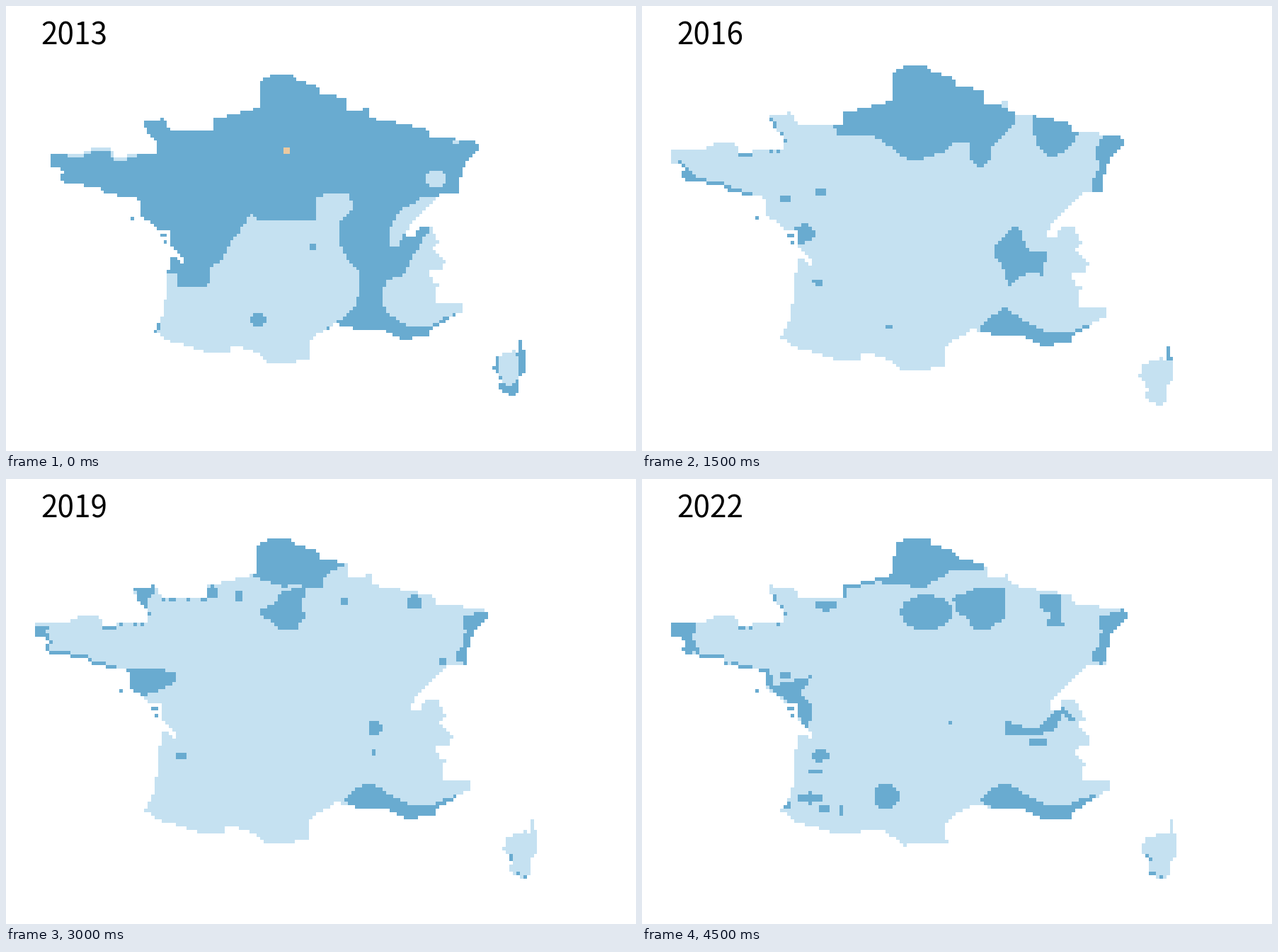
Animation of 890x629 px, one loop 5 s. Source, as a matplotlib script:

```python
import numpy as np
import matplotlib.pyplot as plt
from matplotlib.animation import FuncAnimation
from matplotlib.path import Path

W, H, DPI = 890, 629, 100
COLS, ROWS = 146, 99
SMALL = (63.4, 96.7, 4.688)    # left, top, cell size
LARGE = (41.5, 84.1, 4.958)
SEA, LIGHT, DARK, ORANGE = range(4)
PALETTE = np.array([(255, 255, 255), (197, 225, 241),
                    (105, 171, 208), (235, 201, 160)], np.uint8)

# All shapes use the pixels of the large view.
X, Y = np.meshgrid(LARGE[0] + (np.arange(COLS) + 0.5) * LARGE[2],
                   LARGE[1] + (np.arange(ROWS) + 0.5) * LARGE[2])


def polygon(points):
    cells = np.column_stack([X.ravel(), Y.ravel()])
    return Path(points).contains_points(cells).reshape(X.shape)


def ellipse(x, y, rx, ry):
    return ((X - x) / rx) ** 2 + ((Y - y) / ry) ** 2 < 1.15


def rect(x1, y1, x2, y2):
    return (X > x1) & (X < x2) & (Y > y1) & (Y < y2)


def pairs(*numbers):
    return np.reshape(numbers, (-1, 2)).astype(float)


# ---- land: key points of the coast, clockwise from the western tip ----
NORTH = pairs(41, 204, 87, 202, 101, 195, 130, 194, 137, 208, 151, 208,
              156, 204, 201, 204, 201, 189, 187, 172, 181, 159, 181, 150,
              187, 154, 211, 150, 221, 168, 285, 170, 285, 150, 303, 147,
              352, 134, 356, 92, 374, 84, 403, 84, 408, 95, 436, 98,
              444, 112, 482, 119, 484, 139, 508, 138, 514, 128, 518, 149,
              600, 164, 609, 177, 678, 184)
EAST = pairs(682, 196, 661, 216, 652, 246, 651, 263, 622, 263, 576, 310,
             572, 328, 586, 328, 590, 313, 610, 313, 621, 338, 611, 345,
             631, 364, 624, 376, 606, 379, 611, 393, 625, 400, 616, 405,
             619, 425, 656, 427, 656, 438, 606, 468, 604, 477, 566, 479)
SOUTH = pairs(534, 464, 505, 466, 468, 457, 438, 473, 428, 483, 428, 506,
              433, 511, 368, 516, 342, 495, 312, 491, 308, 501, 276, 500,
              240, 489, 208, 479, 206, 471, 191, 471, 203, 458, 211, 440,
              216, 383, 221, 358, 231, 358, 240, 370, 240, 361, 221, 340,
              221, 318, 206, 318, 177, 296, 172, 270, 120, 262, 112, 252,
              62, 248, 57, 238, 62, 230, 57, 223, 42, 223)
CORSICA = pairs(740, 481, 745, 481, 750, 503, 750, 530, 741, 540, 740, 555,
                733, 566, 711, 554, 715, 542, 702, 523, 707, 506, 734, 497,
                740, 500)
ISLANDS = rect(206, 323, 216, 328) | rect(211, 333, 216, 338) \
    | rect(161, 298, 166, 303)


def make_land(stretch):
    corner = np.array(LARGE[:2])
    coast = np.vstack([NORTH, EAST, SOUTH])
    shapes = [corner + (s - corner) * stretch for s in (coast, CORSICA)]
    return polygon(shapes[0]) | polygon(shapes[1]) | ISLANDS


def steps_to_sea(land, limit=4):
    depth, rest = np.zeros(land.shape, int), land
    for _ in range(limit):
        depth += rest
        p = np.pad(rest, 1)
        rest = rest & p[:-2, 1:-1] & p[2:, 1:-1] & p[1:-1, :-2] & p[1:-1, 2:]
    return depth


EARLY, LATE = make_land(1), make_land((1.006, 1.005))


class Year:
    def __init__(self, land=EARLY, kind=LIGHT, view=LARGE):
        self.land, self.view = land, view
        self.kind = np.full(X.shape, kind)
        self.kind[ISLANDS] = DARK

    def area(self, *xy, kind=DARK):
        self.kind[polygon(pairs(*xy))] = kind
        return self

    def ovals(self, *items, kind=DARK):
        for item in items:
            self.kind[ellipse(*item)] = kind
        return self

    def shore(self, box, depth=1, share=1, kind=DARK):
        """Colour the cells near the sea in a box, or a random share."""
        steps = steps_to_sea(self.land)
        chosen = np.random.default_rng(5).random(X.shape) < share
        self.kind[rect(*box) & (steps > 0) & (steps <= depth) & chosen] = kind
        return self


# ---- places that return in several years ----
BRITTANY_TIP = (40, 202, 78, 204, 72, 225, 80, 243, 60, 250, 40, 240)
BRITTANY_SOUTH = (50, 210, 158, 270)
COTENTIN = (178, 146, 216, 146, 210, 160, 200, 172, 201, 189, 196, 189,
            186, 170)
ALSACE = (648, 194, 684, 183, 684, 196, 660, 238, 652, 264, 632, 254,
          645, 235, 649, 215)
JURA = (625, 268, 596, 268, 558, 292, 547, 318, 549, 340, 558, 343,
        570, 322, 625, 277)
RIVIERA = (478, 455, 488, 441, 512, 429, 525, 435, 547, 448, 571, 462,
           600, 463, 621, 452, 650, 442, 606, 480, 586, 490, 500, 470)


def alps(year, west):
    year.area(612, 308, 601, 325, 586, 350, 568, 383, west + 10, 390,
              west, 403, west, 424, 547, 444, 576, 461, 606, 463, 631, 446,
              662, 437, 662, 420, 640, 350, kind=LIGHT)
    return year.area(*JURA, kind=LIGHT)


y13 = alps(Year(kind=DARK, view=SMALL), 537)
y13.area(190, 520, 211, 430, 215, 383, 228, 383, 229, 401, 265, 402, 279, 396,
         279, 373, 299, 361, 309, 335, 328, 312, 339, 292, 349, 302, 437, 300,
         438, 268, 453, 263, 487, 263, 493, 282, 473, 307, 473, 337, 487, 366,
         502, 376, 502, 407, 498, 431, 478, 447, 440, 474, 429, 521,
         kind=LIGHT)
y13.ovals((616, 240, 15, 12), (726, 522, 14, 26), (646, 186, 5, 3), kind=LIGHT)
y13.shore((65, 190, 170, 212), kind=LIGHT)
y13.ovals((350, 451, 12, 9), (435, 342, 5, 5))
y13.ovals((394, 198, 5, 5), kind=ORANGE)

y14 = Year(view=SMALL)
y14.area(319, 130, 319, 174, 346, 174, 385, 213, 400, 213, 425, 203, 440, 188,
         455, 168, 479, 154, 479, 80, 340, 80)
y14.area(235, 165, 315, 140, 315, 151, 275, 189, 255, 189)
y14.area(*COTENTIN).area(*BRITTANY_TIP).area(*ALSACE)
y14.shore((75, 190, 121, 210), 2).shore(BRITTANY_SOUTH)
y14.area(170, 273, 210, 273, 215, 262, 222, 273, 240, 279, 218, 286, 222, 311,
         240, 312, 240, 325, 228, 340, 205, 320, 172, 292, 196, 290, 195, 280)
y14.area(562, 150, 631, 177, 631, 194, 602, 213, 567, 213, 562, 203)
y14.area(498, 437, 513, 430, 532, 448, 557, 461, 557, 476, 498, 464)
y14.ovals((249, 262, 5, 5), (477, 173, 5, 5), (487, 185, 5, 3),
          (515, 351, 12, 13), (517, 375, 4, 20), (554, 372, 8, 5))
y14.shore((616, 438, 648, 462), 2).shore((711, 550, 740, 567), 2)
y14.shore((738, 480, 746, 496))

y15 = alps(Year(kind=DARK), 522)
y15.area(349, 253, 375, 242, 400, 258, 433, 245, 487, 241, 507, 230, 532, 228,
         532, 264, 513, 305, 497, 325, 480, 328, 482, 363, 507, 373, 507, 392,
         498, 429, 480, 445, 455, 462, 418, 478, 418, 520, 195, 520, 216, 403,
         216, 383, 230, 385, 236, 402, 280, 405, 290, 393, 280, 380, 300, 350,
         290, 340, 290, 323, 312, 312, 315, 288, 344, 263, kind=LIGHT)
y15.area(315, 204, 339, 208, 355, 220, 349, 243, 322, 218, kind=LIGHT)
y15.ovals((616, 228, 20, 20), (729, 520, 12, 14), (250, 204, 20, 10),
          (408, 218, 5, 5), (114, 228, 17, 10), (163, 241, 27, 12),
          (512, 135, 6, 6), kind=LIGHT)
y15.area(204, 442, 230, 437, 270, 442, 281, 470, 250, 476, 195, 471)
y15.area(285, 403, 310, 408, 324, 427, 355, 432, 385, 443, 380, 462, 350, 468,
         315, 443, 298, 435)
y15.area(384, 278, 410, 263, 414, 263, 414, 283, 394, 286)
y15.ovals((436, 342, 3, 5), (351, 377, 7, 4))

y17 = Year().area(*ALSACE).area(*RIVIERA).shore(BRITTANY_SOUTH)
y17.area(268, 170, 285, 155, 308, 152, 354, 130, 350, 80, 482, 80, 484, 139,
         507, 146, 523, 150, 523, 164, 497, 189, 482, 199, 471, 199, 458, 184,
         443, 184, 428, 203, 403, 213, 379, 213, 344, 189, 319, 174, 280, 180)
y17.area(557, 155, 590, 160, 611, 174, 601, 204, 572, 209, 561, 193)
y17.area(522, 317, 533, 317, 543, 346, 571, 348, 564, 362, 567, 382, 548, 372,
         517, 397, 512, 370, 502, 355, 502, 338)
y17.ovals((478, 214, 10, 9), (252, 262, 7, 5), (204, 273, 7, 6),
          (231, 321, 9, 9), (248, 391, 7, 4), (349, 455, 5, 3))
y17.shore((181, 150, 206, 210), share=0.5).shore((738, 480, 746, 501))

y19 = Year().area(*ALSACE).area(*RIVIERA).area(*COTENTIN)
y19.shore(BRITTANY_SOUTH).shore((40, 210, 60, 224), 2)
y19.area(349, 139, 350, 80, 440, 80, 480, 122, 452, 134, 447, 152, 425, 154,
         408, 145, 395, 154, 364, 142)
y19.area(406, 154, 424, 154, 418, 180, 424, 193, 410, 213, 389, 213, 359, 192,
         359, 185, 384, 174, 386, 163)
y19.area(166, 268, 216, 268, 240, 273, 240, 288, 206, 303, 188, 309, 171, 290)
y19.ovals((329, 167, 5, 8), (292, 160, 8, 10), (478, 174, 5, 5),
          (577, 175, 10, 10), (521, 351, 9, 10), (248, 392, 8, 5),
          (520, 387, 3, 5), (616, 258, 5, 5))
y19.shore((155, 165, 290, 212), share=0.5).shore((705, 525, 746, 566), share=.3)

y21 = Year(LATE).shore(BRITTANY_SOUTH, share=0.6)
y21.area(285, 154, 305, 159, 354, 130, 350, 80, 440, 80, 460, 112, 488, 116,
         488, 133, 462, 140, 463, 166, 430, 179, 428, 199, 413, 213, 389, 213,
         350, 192, 344, 176, 330, 179, 310, 169, 285, 169)
y21.area(458, 172, 472, 164, 492, 165, 492, 189, 480, 187, 460, 179)
y21.area(502, 450, 517, 437, 530, 451, 566, 467, 606, 466, 631, 455,
         606, 480, 586, 490, 502, 468)
y21.ovals((666, 206, 6, 8), (518, 349, 6, 6), (530, 355, 7, 3),
          (519, 378, 3, 20), (562, 376, 6, 5), (250, 391, 5, 5),
          (196, 231, 5, 3), (641, 450, 6, 3))
y21.shore((165, 150, 285, 340), share=0.4).shore((705, 525, 722, 560), share=.6)

y22 = Year(LATE).area(*ALSACE).area(*RIVIERA).area(*BRITTANY_TIP)
y22.shore(BRITTANY_SOUTH, share=0.8).shore((285, 135, 340, 170))
y22.area(339, 147, 350, 80, 440, 80, 484, 117, 482, 130, 435, 131, 395, 155,
         362, 148)
y22.area(440, 168, 477, 153, 513, 153, 513, 194, 490, 214, 468, 214, 458, 196,
         442, 189)
y22.area(562, 162, 592, 162, 592, 198, 597, 209, 571, 209, 577, 190, 562, 184)
y22.area(166, 268, 180, 268, 187, 292, 240, 278, 225, 302, 240, 320, 240, 338,
         229, 357, 218, 325, 172, 290)
y22.area(512, 338, 530, 348, 557, 353, 590, 321, 611, 338, 606, 343, 594, 331,
         580, 358, 545, 361, 512, 363)
y22.ovals((402, 189, 34, 23), (345, 449, 17, 17), (560, 372, 11, 6),
          (260, 179, 15, 7), (252, 391, 12, 8), (238, 451, 16, 7),
          (257, 466, 12, 3), (245, 414, 10, 3), (204, 278, 8, 5),
          (205, 462, 6, 4), (436, 345, 3, 3), (282, 469, 3, 7))
y22.shore((185, 150, 212, 210), share=0.5).shore((705, 525, 735, 566), share=.6)


def blur(values, r=2):
    wide = np.pad(values.astype(float), r)
    return sum(wide[j:j + ROWS, i:i + COLS]
               for j in range(2 * r + 1) for i in range(2 * r + 1))


def between(a, b, land):
    """A year halfway between its neighbours, with smooth borders."""
    mean = ((a.kind == DARK) + 1.0 * (b.kind == DARK)) / 2 * land
    near = blur(mean) / np.maximum(blur(land), 1)
    year = Year(land)
    year.kind[0.4 * mean + 0.6 * near > 0.58] = DARK
    return year


def render(year):
    left, top, size = year.view
    kind = np.pad(np.where(year.land, year.kind, SEA), 1)
    col = np.floor((np.arange(W) + 0.5 - left) / size).astype(int) + 1
    row = np.floor((np.arange(H) + 0.5 - top) / size).astype(int) + 1
    return PALETTE[kind[np.ix_(row.clip(0, ROWS + 1), col.clip(0, COLS + 1))]]


y16 = between(y15, y17, EARLY)
y18 = between(y17, y19, EARLY)
y20 = between(y19, y21, LATE)
maps = [render(y) for y in (y13, y14, y15, y16, y17, y18, y19, y20, y21, y22)]

fig = plt.figure(figsize=(W / DPI, H / DPI), dpi=DPI, facecolor="white")
ax = fig.add_axes([0, 0, 1, 1])
ax.axis("off")
picture = ax.imshow(maps[0], aspect="auto", interpolation="nearest")
label = fig.text(49 / W, 1 - 54.5 / H, "2013", family="Noto Sans CJK JP",
                 fontsize=42.3 * 72 / DPI, color="black", va="baseline")


def draw(i):
    picture.set_data(maps[i])
    label.set_text(str(2013 + i))
    return picture, label


anim = FuncAnimation(fig, draw, frames=len(maps), interval=500, repeat=True)
plt.show()
```
